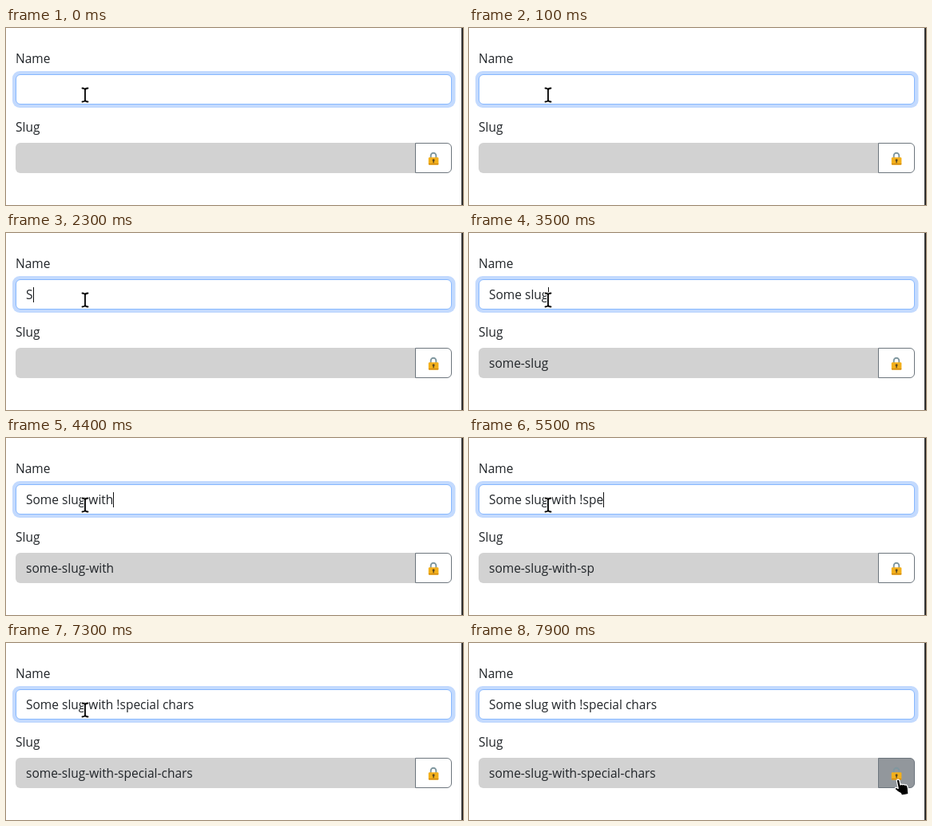
An HTML page that plays this animation: 572 px wide and 222 px high, repeating every 8 s.

```html
<!DOCTYPE html>
<html lang="en">
<head>
<meta charset="utf-8">
<title>Name and slug</title>
<style>
  html, body { margin: 0; width: 100%; height: 100%; overflow: hidden; background: #fff; }
  svg { display: block; width: 572px; height: 222px; }
  text { font: 15.5px "Open Sans", "Noto Sans", sans-serif; fill: #212529; white-space: pre; }
  .pointer path { stroke-linejoin: round; stroke-linecap: round; }
</style>
</head>
<body>
<svg viewBox="0 0 572 222">
  <rect x="570" width="2" height="222" fill="#303030"/>

  <text x="12" y="44">Name</text>
  <rect x="8" y="54" width="554.5" height="46" rx="9" fill="#c3dafe"/>
  <rect x="12.5" y="58.5" width="545" height="37" rx="5.5" fill="#fff" stroke="#86b7fe"/>
  <text id="name" x="25" y="83" xml:space="preserve"></text>
  <rect id="caret" y="68" width="1" height="19" fill="#111"/>

  <text x="12" y="130">Slug</text>
  <path d="M18 144H513V182H18a6 6 0 0 1-6-6V150a6 6 0 0 1 6-6z" fill="#d2d2d2"/>
  <text id="slug" x="25" y="169"></text>
  <path id="button" d="M512.5 144.5H552a5.5 5.5 0 0 1 5.5 5.5V176a5.5 5.5 0 0 1-5.5 5.5H512.5z" stroke="#6c757d"/>
  <g id="lock">
    <path d="M531.7 163.5V160a3.3 3.3 0 0 1 6.6 0V163.5" fill="none" stroke="#7f979f" stroke-width="1.9"/>
    <rect x="528.8" y="162.2" width="12.6" height="9.6" rx="1.4" fill="#f3b01c"/>
    <path d="M529 170.6H541.2" stroke="#d18a14" stroke-width="1.4"/>
    <circle cx="535.1" cy="165.8" r="1.5" fill="#5f4a20"/>
    <path d="M535.1 166V169.2" stroke="#5f4a20" stroke-width="1.4"/>
  </g>

  <g id="beam" class="pointer" fill="none">
    <path d="M-3.5 -8.5Q0 -8.5 0 -6Q0 -8.5 3.5 -8.5M0 -6V6M-3.5 8.5Q0 8.5 0 6Q0 8.5 3.5 8.5" stroke="#fff" stroke-width="3.6"/>
    <path d="M-3.5 -8.5Q0 -8.5 0 -6Q0 -8.5 3.5 -8.5M0 -6V6M-3.5 8.5Q0 8.5 0 6Q0 8.5 3.5 8.5" stroke="#000" stroke-width="1.8"/>
  </g>
  <g id="arrow" class="pointer">
    <path d="M0 0V16L3.8 12.4L6.4 18L9 16.8L6.5 11.4H11.5z" stroke="#fff" stroke-width="1.2"/>
  </g>
  <g id="hand" class="pointer">
    <path d="M-1.8 1.4Q0 -1 1.8 1.4L3 7Q4.4 5.6 5.8 6.8Q7.4 5.8 8.7 7.2Q10.4 6.3 11.4 8Q13 11.5 12.6 14.5L13 18.5L4.5 20L3.4 17.6Q-.5 16 -3.4 12.6Q-4.4 10.6 -2.4 10.2L.2 11.4z" stroke="#fff" stroke-width="1.2"/>
  </g>
</svg>
<script>
const LOOP = 8000, STEP = 100, SLUG_LAG = 100;
const TEXT = "Some slug with !special chars";

// One typing time per character of TEXT
const KEYS = [
  2300, 2500, 2800, 2900, 3000, 3100, 3200, 3300, 3400, 3700,
  4000, 4100, 4200, 4300, 4600,
  5100, 5300, 5400, 5500, 5700, 5800, 5900, 6000, 6300,
  6500, 6600, 6800, 6900, 7000
];
const CARET_ON = [[300, 1300], [2300, 7300]];

// Start time, pointer shape, x, y
const POINTER = [
  [0, "beam", 99, 84],
  [7500, "beam", 142, 88],
  [7600, "arrow", 262, 106],
  [7700, "arrow", 402, 140],
  [7800, "arrow", 505, 166],
  [7900, "hand", 537, 171]
];

const el = id => document.getElementById(id);
const typed = t => TEXT.slice(0, KEYS.filter(k => k <= t).length);
const slugify = s => s.toLowerCase().replace(/[^a-z ]/g, "").trim().replace(/ +/g, "-");
const show = (node, on) => node.setAttribute("visibility", on ? "visible" : "hidden");

function setText(node, value) {
  if (node.textContent !== value) node.textContent = value;
}

function draw(t) {
  const name = el("name");
  setText(name, typed(t));
  setText(el("slug"), slugify(typed(t - SLUG_LAG)));

  const width = name.textContent ? name.getComputedTextLength() : 0;
  el("caret").setAttribute("x", Math.round(25 + width));
  show(el("caret"), CARET_ON.some(([from, to]) => t >= from && t < to));

  const [, shape, x, y] = POINTER.filter(p => p[0] <= t).pop();
  for (const id of ["beam", "arrow", "hand"]) show(el(id), id === shape);
  el(shape).setAttribute("transform", `translate(${x} ${y})`);

  const hover = shape === "hand";
  el("button").setAttribute("fill", hover ? "#92979c" : "#fff");
}

const start = performance.now();
function tick() {
  const t = (performance.now() - start) % LOOP;
  draw(Math.floor(t / STEP) * STEP);
  requestAnimationFrame(tick);
}
tick();
</script>
</body>
</html>
```
